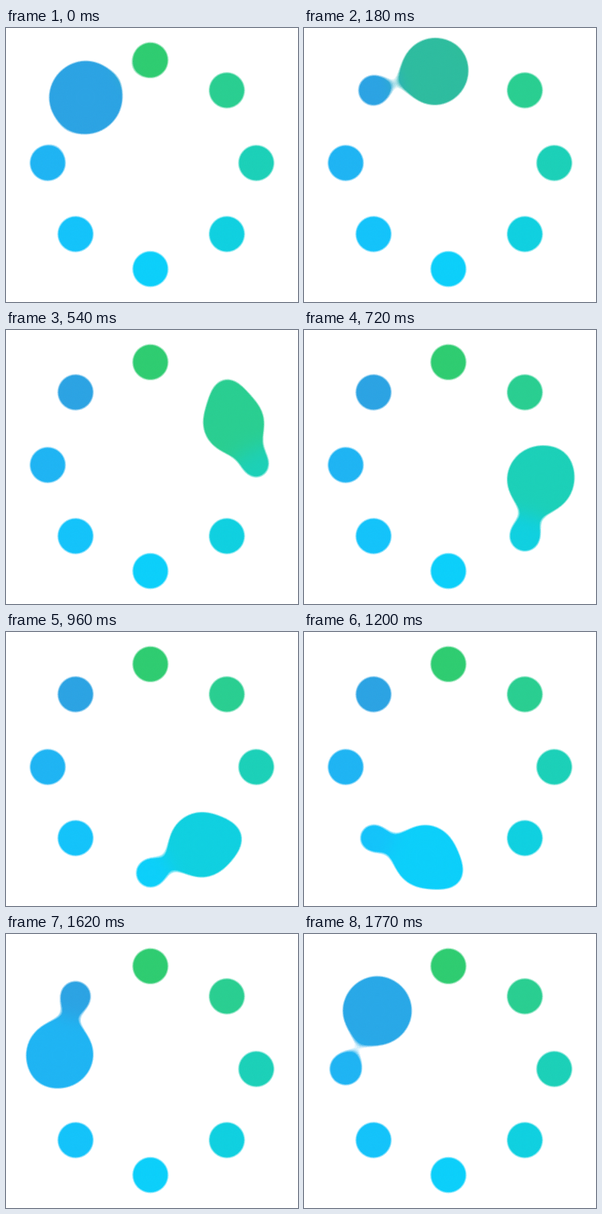
Recreate the animation shown at these times as an HTML page. Size 366 by 343 pixels, loop 1.8 s.

```html
<!DOCTYPE html>
<html lang="en">
<head>
<meta charset="utf-8">
<title>Gooey loader</title>
<style>
html, body { margin: 0; width: 100%; height: 100%; overflow: hidden; background: #fff; }
svg { display: block; width: 366px; height: 343px; }
</style>
</head>
<body>
<svg viewBox="0 0 366 343" xmlns="http://www.w3.org/2000/svg">
  <defs>
    <filter id="goo" filterUnits="userSpaceOnUse" x="-60" y="-60" width="486" height="463" color-interpolation-filters="sRGB">
      <feGaussianBlur stdDeviation="15"/>
      <feColorMatrix values="1 0 0 0 0  0 1 0 0 0  0 0 1 0 0  0 0 0 18 -7"/>
    </filter>
  </defs>
  <g id="goop" filter="url(#goo)"></g>
</svg>
<script>
const LOOP = 1800, STEP = 30;
const CENTER_X = 182, CENTER_Y = 169;
const RING = 130.7, ORBIT = 116;
const DOT = 24, BLOB = 45;
const SPACING = 45, HALF = SPACING / 2;

// Clockwise from the top
const colors = ['#2fcc71', '#2ace91', '#1cd0b8', '#10d0e0', '#0ccffa', '#14c3fa', '#1fb4f3', '#2ca3e3']
  .map(hex => [1, 3, 5].map(i => parseInt(hex.slice(i, i + 2), 16)));
const group = document.getElementById('goop');
const radians = degrees => degrees * Math.PI / 180;
const mix = (a, b, k) => a.map((v, i) => v + (b[i] - v) * k);

// 0 on a dot, 1 halfway to the next one, 0 again beyond
const squeeze = degrees => Math.max(0, 1 - Math.abs(1 - degrees / HALF));

function addCircle() {
  return group.appendChild(document.createElementNS('http://www.w3.org/2000/svg', 'circle'));
}

function setCircle(circle, x, y, r, color) {
  circle.setAttribute('cx', x);
  circle.setAttribute('cy', y);
  circle.setAttribute('r', r);
  circle.setAttribute('fill', `rgb(${color.map(Math.round)})`);
}

// The ring is slightly uneven: diagonal dots lean towards the sides
function dotPosition(index) {
  const a = radians(index * SPACING - 90);
  const lean = a - radians(1.5) * Math.sin(2 * a);
  return [
    CENTER_X + Math.cos(2 * a) + RING * Math.cos(lean),
    CENTER_Y - Math.cos(2 * a) + Math.cos(4 * a) + RING * Math.sin(lean)
  ];
}

const dots = colors.map(addCircle);
const blob = addCircle();

function render(time) {
  const t = Math.floor((time % LOOP) / STEP) * STEP;
  const heading = (360 * t / LOOP + 7 * SPACING) % 360;

  dots.forEach((dot, i) => {
    const gap = Math.abs((i * SPACING - heading + 540) % 360 - 180);
    setCircle(dot, ...dotPosition(i), DOT - 6 * squeeze(gap), colors[i]);
  });

  const index = Math.floor(heading / SPACING);
  const past = heading % SPACING;
  const color = mix(colors[index], colors[(index + 1) % colors.length], Math.max(0, past / HALF - 1));
  const a = radians(heading - 90);
  setCircle(blob, CENTER_X + ORBIT * Math.cos(a), CENTER_Y + ORBIT * Math.sin(a),
    BLOB - 9 * squeeze(past), color);
}

const begin = performance.now();
function tick() {
  render(performance.now() - begin);
  requestAnimationFrame(tick);
}
render(0);
requestAnimationFrame(tick);
</script>
</body>
</html>
```
